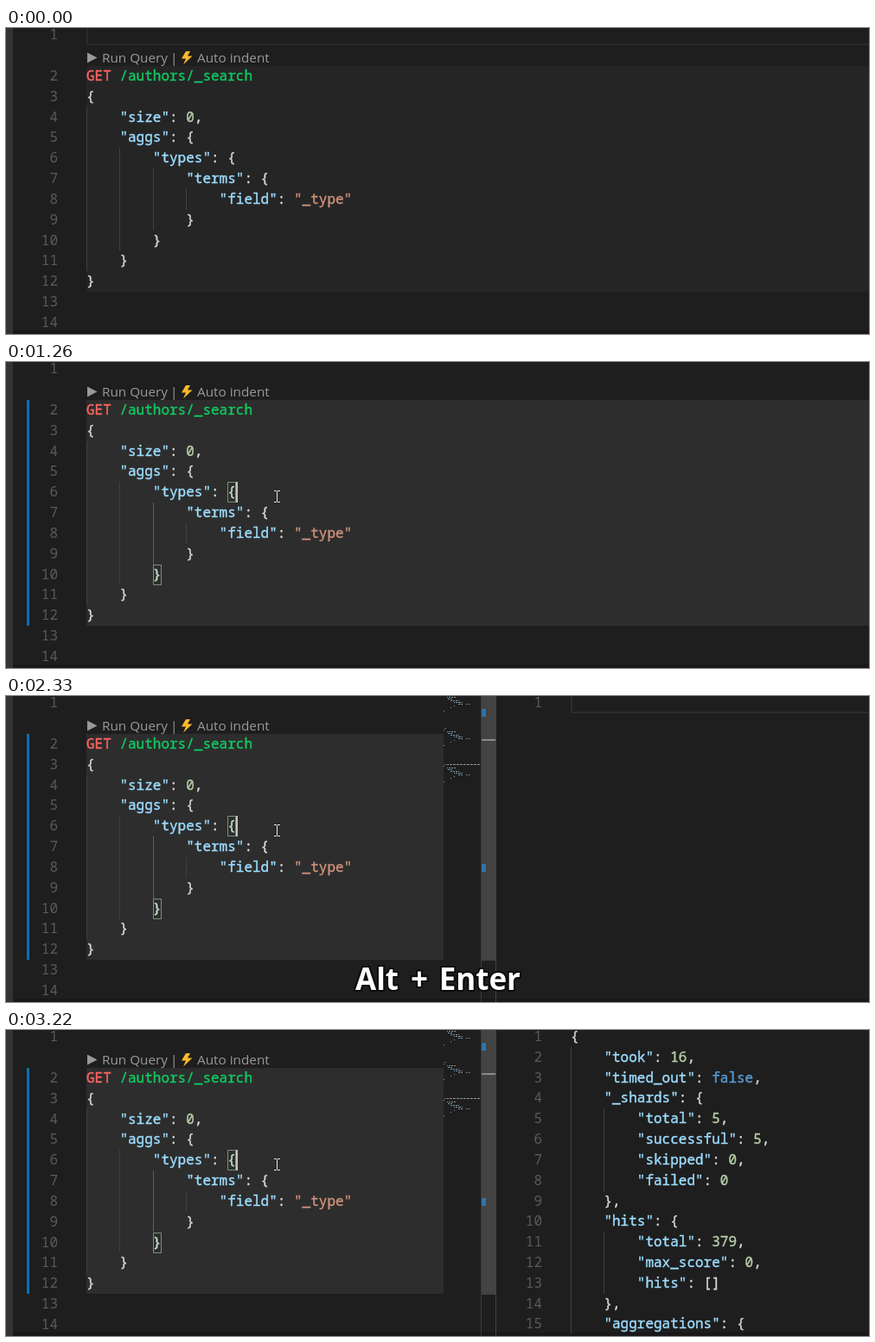
These frames come from a looping animation (998 by 355 pixels, 3300 ms). An HTML page with a canvas:

```html
<!DOCTYPE html>
<html lang="en">
<head>
<meta charset="utf-8">
<title>Query editor</title>
<style>
  html, body { margin: 0; width: 100%; height: 100%; overflow: hidden; background: #1e1e1e; }
  canvas { display: block; }
</style>
</head>
<body>
<canvas id="stage" width="998" height="355"></canvas>
<script>
const ctx = document.getElementById('stage').getContext('2d');
const LOOP = 3300, ROW = 23.82, CHAR = 9.6;
const LEFT = 93, RIGHT = 653;
const MONO = '16px "Noto Sans Mono", monospace';
const COLOR = {
  method: '#ff6460', path: '#13c860', key: '#9cdcfe', string: '#ce9178',
  number: '#b5cea8', word: '#569cd6', plain: '#d8d8d8'
};

const query = `GET /authors/_search
{
    "size": 0,
    "aggs": {
        "types": {
            "terms": {
                "field": "_type"
            }
        }
    }
}`.split('\n');

const response = `{
    "took": 16,
    "timed_out": false,
    "_shards": {
        "total": 5,
        "successful": 5,
        "skipped": 0,
        "failed": 0
    },
    "hits": {
        "total": 379,
        "max_score": 0,
        "hits": []
    },
    "aggregations": {`.split('\n');

function tokenize(line) {
  const pattern = /(GET)|(\/\S+)|("\w+"(?=:))|("\w+")|(\d+)|([a-z]+)|([^\s\w"]+)/g;
  const kinds = Object.keys(COLOR);
  return [...line.matchAll(pattern)].map(m => ({
    text: m[0], col: m.index, color: COLOR[kinds[m.slice(1).findIndex(Boolean)]]
  }));
}

function rect(x, y, w, h, color) {
  ctx.fillStyle = color;
  ctx.fillRect(x, y, w, h);
}

function frame(x, y, w, h, color, lineWidth = 1) {
  ctx.strokeStyle = color;
  ctx.lineWidth = lineWidth;
  ctx.strokeRect(x + lineWidth / 2, y + lineWidth / 2, w - lineWidth, h - lineWidth);
}

function polygon(points, color) {
  ctx.fillStyle = color;
  ctx.beginPath();
  points.forEach(([x, y]) => ctx.lineTo(x, y));
  ctx.fill();
}

function text(str, x, y, color, font = MONO, align = 'left') {
  ctx.font = font;
  ctx.textAlign = align;
  ctx.fillStyle = color;
  ctx.fillText(str, x, y);
}

function outline(str, x, y, color, width) {
  ctx.lineJoin = 'round';
  ctx.lineWidth = width;
  ctx.strokeStyle = color;
  ctx.strokeText(str, x, y);
}

const leftTop = n => n === 1 ? -4 : Math.round(44 + (n - 2) * ROW);
const rightTop = n => Math.round(-4 + (n - 1) * ROW);

function lineNumbers(x, count, top) {
  for (let n = 1; n <= count; n++) text(n, x - 33, top(n) + 17, '#5a5a5a', MONO, 'right');
}

function code(lines, x, first, top, highlighted = true) {
  lines.forEach((line, i) => {
    const y = top(first + i), next = top(first + i + 1);
    for (let col = 0; col < line.search(/\S/); col += 4) {
      rect(Math.round(x + col * CHAR), y, 1, next - y, '#404040');
    }
    for (const t of tokenize(line)) {
      const color = highlighted ? t.color : COLOR.plain, left = x + t.col * CHAR;
      text(t.text, left, y + 17, color);
      outline(t.text, left, y + 17, color, 0.4); // medium weight
    }
  });
}

function codeLens() {
  const font = '15.3px "Open Sans", "Noto Sans", sans-serif', gray = '#999999';
  polygon([[94, 28.5], [105.5, 34.5], [94, 40.5]], gray);
  text('Run Query', 111, 40, gray, font);
  text('|', 190, 40, gray, font);
  polygon([[208, 27], [213, 27], [210, 32.5], [215.5, 32.5], [205, 42.5], [208, 35.5], [203, 35.5]], '#fdb92c');
  text('Auto indent', 221, 40, gray, font);
}

function minimap() {
  ctx.globalAlpha = 0.65;
  for (const top of [-3, 37, 79]) {
    query.forEach((line, row) => {
      for (const t of tokenize(line)) {
        if (t.color === COLOR.path) continue;
        for (let i = 0; i < t.text.length; i++) {
          if ((i + row) % 3) rect(506 + t.col + i, top + row * 2, 1, 1, t.color);
        }
      }
    });
  }
  for (let x = 510; x < 548; x++) if (x % 4) rect(x, 79, 1, 1, COLOR.plain);
  ctx.globalAlpha = 1;
}

function overviewRuler() {
  rect(549, 0, 1, 355, '#3a3a3a');
  rect(550, 0, 16, 307, '#434343');
  rect(566, 0, 1, 355, '#444444');
  rect(550, 15, 5, 9, '#2f74aa');
  rect(550, 195, 5, 9, '#2f74aa');
  rect(550, 50, 16, 2, '#8a8a8a');
}

function pointer(t) {
  const step = [140, 210, 280, 360, 430].filter(at => t >= at).length;
  if (!step) return;
  const p = (step - 1) / 4, move = 1 - (1 - p) ** 2;
  const x = Math.round(323 - 10 * move), y = Math.round(26 + 129 * move);
  const ink = '#e6e6e6';
  rect(x, y - 5, 1, 12, ink);
  for (const edge of [y - 6, y + 7]) {
    rect(x - 3, edge, 3, 1, ink);
    rect(x + 1, edge, 3, 1, ink);
  }
}

function shortcut() {
  const font = 'bold 35px "Open Sans", "Noto Sans", sans-serif';
  for (const [word, x, align] of [['Alt', 404, 'left'], ['+', 478, 'center'], ['Enter', 595, 'right']]) {
    ctx.font = font;
    ctx.textAlign = align;
    outline(word, x, 341, '#0c0c0c', 4);
    text(word, x, 341, '#ffffff', font, align);
  }
}

function draw(t) {
  const between = (from, to) => t >= from && t < to;
  const clicked = t >= 1120, active = t >= 1200, split = t >= 2330;
  const blockEnd = split ? 506 : 998;

  rect(0, 0, 998, 355, '#1e1e1e');
  rect(8, 351, 990, 4, '#1a1819');
  rect(0, 0, 8, 355, '#333333');
  rect(LEFT, 44, blockEnd - LEFT, 262, active ? '#2d2d2d' : '#252526');
  if (!clicked) frame(LEFT, -4, 907, 24, '#2a2a2a', 2);
  else if (!active) frame(LEFT, 139, 907, 24, '#2c2c2c', 2);
  if (active) rect(24, 44, 3, 262, '#0b70b5');

  lineNumbers(LEFT, 14, leftTop);
  codeLens();
  if (t >= 1260) {
    for (const [col, n] of [[17, 6], [8, 10]]) {
      const x = Math.round(LEFT + col * CHAR);
      rect(x, leftTop(n), 10, 24, 'rgba(0,100,0,.1)');
      frame(x, leftTop(n), 10, 24, '#888888');
    }
  }
  code(query, LEFT, 2, leftTop);
  if (active) rect(170, leftTop(7), 1, leftTop(10) - leftTop(7), '#606060');
  if (between(1120, 1650) || between(2100, 2680) || t >= 3220) rect(266, 139, 2, 24, '#c4c5c3');

  if (split) {
    minimap();
    overviewRuler();
    if (t < 2410) {
      frame(RIGHT, -4, 347, 24, '#2c2c2c', 2);
      lineNumbers(RIGHT, 1, rightTop);
    } else {
      lineNumbers(RIGHT, 15, rightTop);
      code(response, RIGHT, 1, rightTop, t >= 2620);
    }
  }
  pointer(t);
  if (between(1810, 2620)) shortcut();
}

const start = performance.now();
function tick() {
  draw((performance.now() - start) % LOOP);
  requestAnimationFrame(tick);
}
tick();
</script>
</body>
</html>
```
